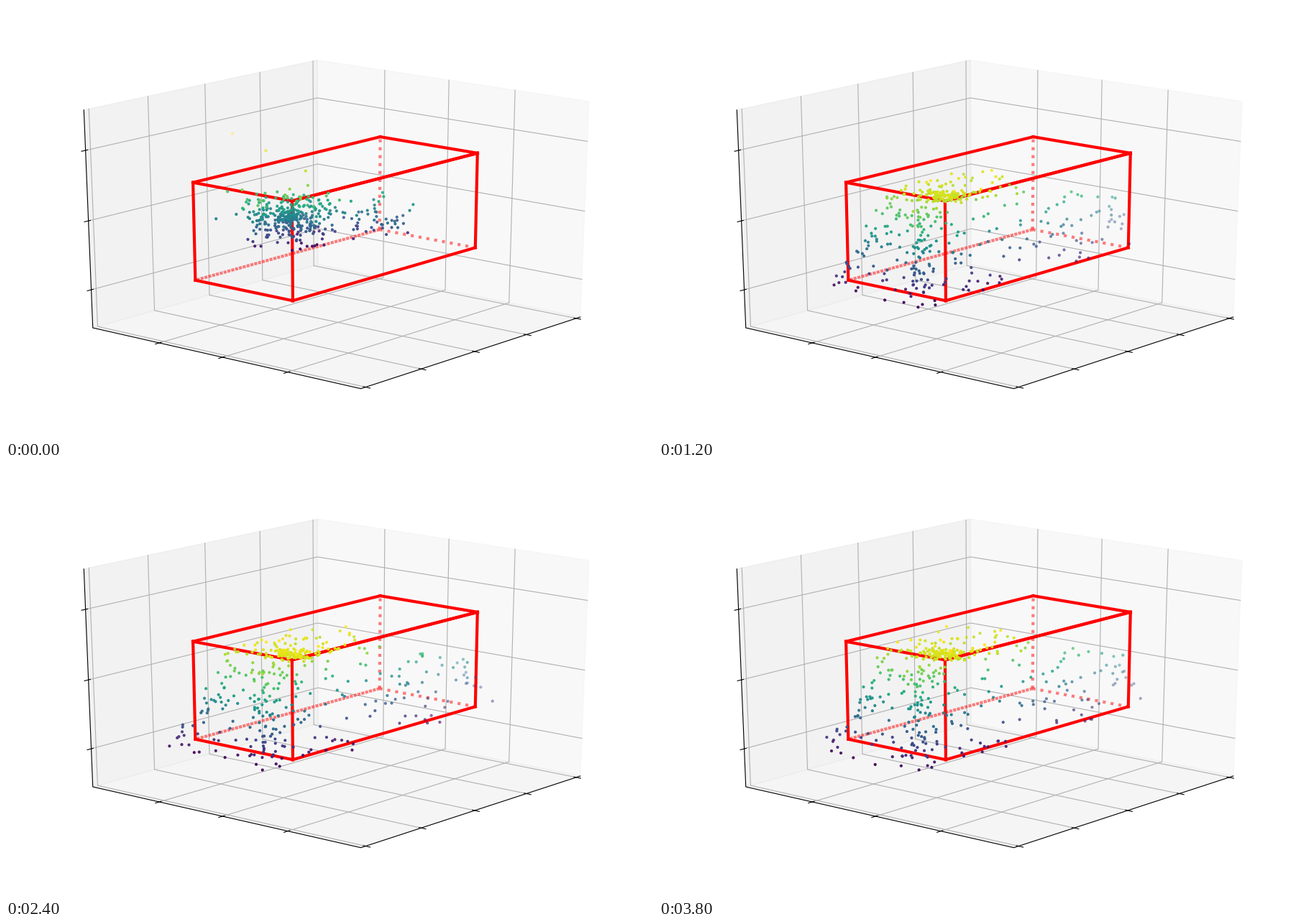
A matplotlib script that plays this animation: 900x600 px, repeating every 3.9 s.

```python
import matplotlib.pyplot as plt
import numpy as np
from itertools import product
from matplotlib.animation import FuncAnimation

W, H, DPI = 900, 600, 100
FRAMES, INTERVAL = 39, 100
ELEV, AZIM = np.radians(20), np.radians(40)
DIST = 10
E = 25 / 48                    # half size of the plot cube, margin included
BOX = np.array([0.425, 0.188, 0.231])
FADE = 0.45                    # seconds the cloud takes to unfold

rng = np.random.default_rng(12)


def project(p):
    """Perspective view: screen position in pixels and depth."""
    x, y, z = np.asarray(p, float).T
    across = y * np.cos(AZIM) - x * np.sin(AZIM)
    along = x * np.cos(AZIM) + y * np.sin(AZIM)
    up = z * np.cos(ELEV) - along * np.sin(ELEV)
    depth = DIST - along * np.cos(ELEV) - z * np.sin(ELEV)
    return np.column_stack([461.8 + 4702.7 * across / depth,
                            292.3 - 3081 * up / depth]), depth


fig = plt.figure(figsize=(W / DPI, H / DPI), dpi=DPI, facecolor="white")
ax = fig.add_axes([0, 0, 1, 1])
ax.set_xlim(0, W)
ax.set_ylim(H, 0)
ax.axis("off")


def line(points, **style):
    xy, _ = project(points)
    ax.plot(xy[:, 0], xy[:, 1], **style)


def pane(points, grey):
    xy, _ = project(points)
    color = (grey, grey, grey, 0.5)
    ax.add_patch(plt.Polygon(xy, fc=color, ec=color, lw=1, zorder=1))


def draw_frame():
    pane([(-E, -E, -E), (-E, E, -E), (-E, E, E), (-E, -E, E)], 0.95)
    pane([(-E, -E, -E), (E, -E, -E), (E, -E, E), (-E, -E, E)], 0.90)
    pane([(-E, -E, -E), (E, -E, -E), (E, E, -E), (-E, E, -E)], 0.925)

    grid = dict(color="#b0b0b0", lw=0.8, zorder=2)
    ink = dict(color="black", lw=0.8, zorder=3)
    out, inn = E + 1 / 60, E - 1 / 120
    for x in np.linspace(-0.5, 0.5, 5):
        line([(x, E, -E), (x, -E, -E), (x, -E, E)], **grid)
        line([(x, out, -E), (x, inn, -E)], **ink)
    for y in (-0.25, 0, 0.25):
        line([(E, y, -E), (-E, y, -E), (-E, y, E)], **grid)
        line([(out, y, -E), (inn, y, -E)], **ink)
    for z in (-1 / 3, 0, 1 / 3):
        line([(E, -E, z), (-E, -E, z), (-E, E, z)], **grid)
        line([(out, -E, z), (inn, -E, z)], **ink)
    line([(E, -E, E), (E, -E, -E), (E, E, -E), (-E, E, -E)], **ink)


def draw_box():
    back = np.array([-1, -1, -1])
    solid = dict(color="red", lw=3, zorder=5)
    for corner in product((-1, 1), repeat=3):
        for axis in range(3):
            if corner[axis] > 0:
                continue
            a = np.array(corner)
            b = a.copy()
            b[axis] = 1
            if (a != back).any():
                line([a * BOX, b * BOX], **solid)
                continue
            # hidden edges are dotted, the long one twice as densely
            for shift in (0, 1.325) if axis == 0 else (0,):
                line([a * BOX, b * BOX], color="red", lw=3, alpha=0.5,
                     zorder=4, ls=(shift, (1, 1.65)))
    # the near top edge is heavier
    line([BOX * (-1, 1, 1), BOX], **solid)


def half_width(z):
    t = np.clip((0.22 - z) / 0.47, 0, 1)
    return 0.10 + 0.10 * t ** 2


def car_points():
    """Points on the visible sides of a car: dense roof edge, roof, end, side, hood."""
    edge = rng.normal((0.33, 0.105, 0.215), (0.03, 0.04, 0.006), (85, 3))

    n = 55
    roof = np.column_stack([rng.uniform(0.0, 0.37, n),
                            rng.uniform(-0.09, 0.19, n),
                            rng.normal(0.215, 0.014, n)])

    n = 125
    z = rng.uniform(-0.26, 0.2, n)
    y = np.sin(np.pi / 2 * rng.uniform(-1, 1, n)) * half_width(z)
    end = np.column_stack([0.35 + 0.36 * (0.22 - z) + rng.normal(0, 0.018, n),
                           y + rng.normal(0, 0.01, n), z])

    n = 135
    x = 0.48 - 0.98 * rng.random(n) ** 1.7
    top = np.where(x > 0, 0.19, 0.19 + 0.5 * x)
    z = -0.25 + (top + 0.25) * rng.random(n)
    side = np.column_stack([x, half_width(z) + rng.normal(0, 0.016, n), z])

    n = 7
    x = rng.uniform(-0.45, -0.05, n)
    hood = np.column_stack([x, rng.uniform(0.08, 0.2, n), 0.17 + 0.4 * x])
    return np.vstack([edge, roof, end, side, hood])


def cloud_points(target):
    """Loose blob with a tight core and a thin group on the far side."""
    n = len(target)
    start = rng.normal((0.14, -0.075, 0.02), (0.07, 0.065, 0.055), (n, 3))
    start[:, 2] += 0.12 * target[:, 2]
    start[:70] = rng.normal((0.14, -0.07, 0.015), (0.016, 0.016, 0.018), (70, 3))
    far = target[:, 0] < -0.08
    start[far] = rng.normal((-0.07, 0.09, -0.01), (0.06, 0.06, 0.045),
                            (far.sum(), 3))
    start[:, 2] = np.clip(start[:, 2], -0.17, 0.19)
    start[90] = -0.22, -0.61, 0.21
    start[91] = -0.116, -0.383, 0.20
    return start


target = car_points()
start = cloud_points(target)
phase = rng.uniform(0, 2 * np.pi, target.shape)
speed = rng.uniform(1.5, 5, target.shape)
sway = np.where(np.arange(len(target)) < 85, 0.006, 0.014)[:, None]

draw_frame()
draw_box()
dots = ax.scatter([], [], s=9, linewidths=0, zorder=6)


def scaled(v):
    return (v - v.min()) / (v.max() - v.min())


def update(i):
    t = i * INTERVAL / 1000
    grow = 1 - np.exp(-t / FADE)
    wobble = sway * grow * np.sin(speed * t + phase)
    points = start + (target - start) * grow + wobble
    xy, depth = project(points)
    colors = plt.cm.viridis(scaled(points[:, 2]))
    colors[:, 3] = 1 - 0.6 * scaled(depth) ** 2
    order = np.argsort(-depth)
    dots.set_offsets(xy[order])
    dots.set_facecolors(colors[order])
    return (dots,)


anim = FuncAnimation(fig, update, frames=FRAMES, interval=INTERVAL,
                     repeat=True, repeat_delay=0)
plt.show()
```
